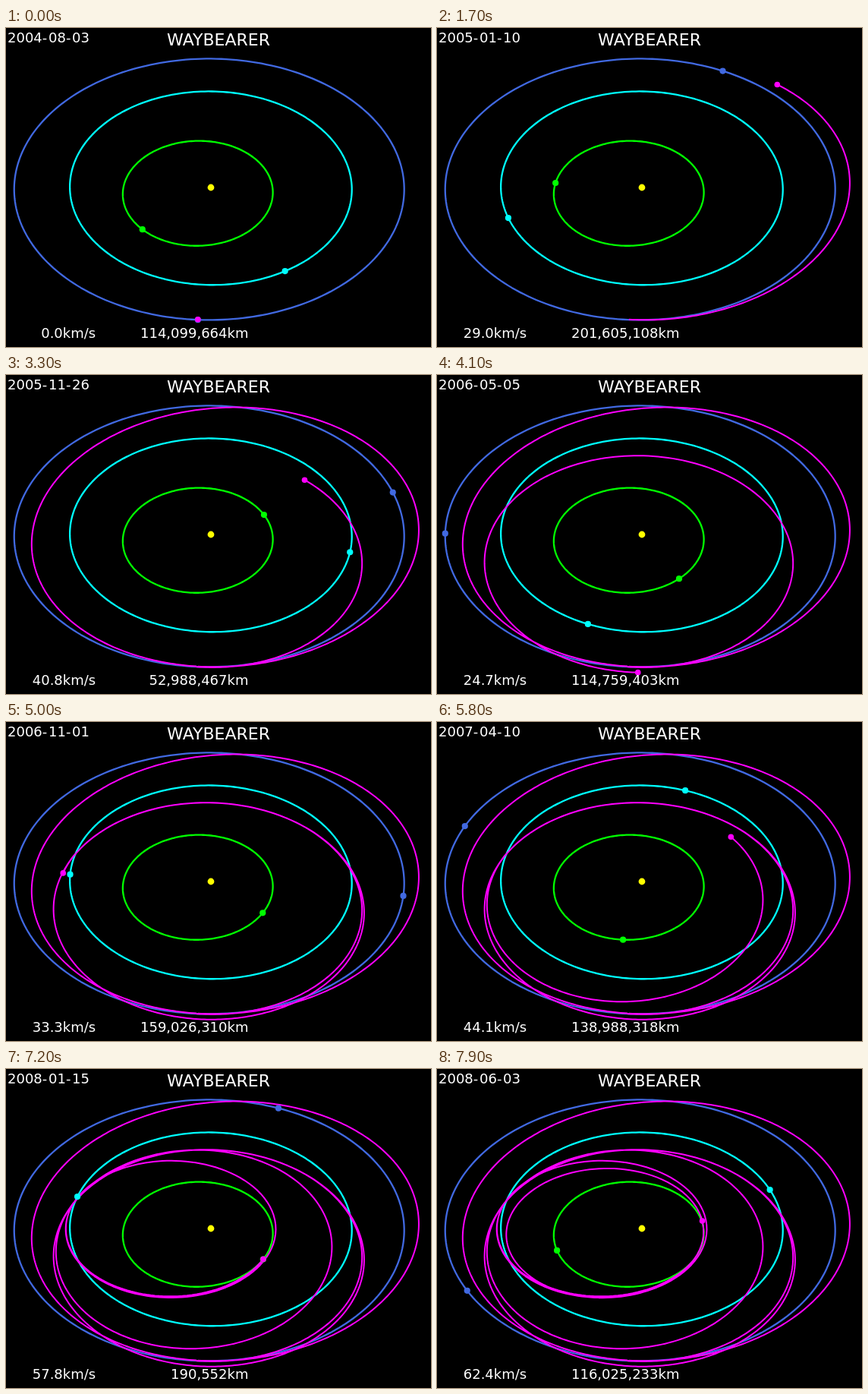
An HTML page with a canvas that plays this animation: 560x420 px, repeating every 8000 ms.

```html
<!DOCTYPE html>
<html lang="en">
<head>
<meta charset="utf-8">
<title>Spacecraft trajectory</title>
<style>
  html, body { margin: 0; width: 100%; height: 100%; overflow: hidden; background: #000; }
  canvas { display: block; }
</style>
</head>
<body>
<canvas id="stage" width="560" height="420"></canvas>
<script>
const ctx = document.getElementById('stage').getContext('2d');
const TAU = 2 * Math.PI, RAD = Math.PI / 180;
const AU_KM = 149597871, SUN_GM = 887.13; // GM in AU km²/s²
const STEP_DAYS = 20, LAST_STEP = 70, VIEW_TURN = 45;
const SUN = { x: 270, y: 210 };
const J2000 = -1675.8; // in days since launch

// Angles are in degrees, distances in AU, the mean anomaly at epoch in radians.
const planet = (color, a, e, incl, node, peri, longitude) =>
  ({ color, a, e, incl, node, peri, epoch: J2000, anomaly: (longitude - peri) * RAD });
const earth = planet('#4169e1', 1, 0.0167, 0, 0, 102.94, 100.46);
const venus = planet('#00ffff', 0.7233, 0.0068, 3.39, 76.68, 131.56, 181.98);
const mercury = planet('#00ff00', 0.3871, 0.2056, 7, 48.33, 77.46, 252.25);
const planets = [earth, venus, mercury];

function eccentricAnomaly(o, day) {
  const M = o.anomaly + 0.985609 * RAD / o.a ** 1.5 * (day - o.epoch);
  let E = M + o.e * Math.sin(M);
  for (let i = 0; i < 8; i++) E -= (E - o.e * Math.sin(E) - M) / (1 - o.e * Math.cos(E));
  return E;
}

const turn = (x, y, degrees) => {
  const c = Math.cos(degrees * RAD), s = Math.sin(degrees * RAD);
  return [x * c - y * s, x * s + y * c];
};

function pointOn(o, E) {
  const [along, across] = turn(o.a * (Math.cos(E) - o.e),
    o.a * Math.sqrt(1 - o.e * o.e) * Math.sin(E), o.peri - o.node);
  const [x, y] = turn(along, across * Math.cos(o.incl * RAD), o.node - VIEW_TURN);
  return { x, y, z: across * Math.sin(o.incl * RAD) };
}

const positionAt = (o, day) => pointOn(o, eccentricAnomaly(o, day));

// Mean anomaly at which an orbit passes the direction of point p.
function anomalyToward(o, p) {
  const [along, flat] = turn(p.x, p.y, VIEW_TURN - o.node);
  const angle = Math.atan2(flat / Math.cos(o.incl * RAD), along) - (o.peri - o.node) * RAD;
  const E = 2 * Math.atan(Math.sqrt((1 - o.e) / (1 + o.e)) * Math.tan(angle / 2));
  return E - o.e * Math.sin(E);
}

// Each leg leaves a planet, or after an engine burn the probe's own position.
const legs = [];
const arcAt = day => legs.findLast(leg => leg.epoch <= day);
function addLeg(epoch, body, plane, perihelion, aphelion, peri) {
  const a = (perihelion + aphelion) / 2;
  const leg = { ...plane, epoch, a, e: 1 - perihelion / a, peri };
  leg.anomaly = anomalyToward(leg, positionAt(body || arcAt(epoch), epoch));
  legs.push(leg);
}
const launchPlane = { incl: 6.3, node: 311 };
const cruisePlane = { incl: 2.5, node: 130.5 };
const steepPlane = { incl: 7.9, node: 47 };
const innerPlane = { incl: 6.9, node: 49 };
addLeg(0, earth, launchPlane, 0.921, 1.0765, 206.8);
addLeg(364.5, earth, cruisePlane, 0.602, 1.0153, 133.3);
addLeg(496.2, null, cruisePlane, 0.602, 1.055, 132.3);
addLeg(812.1, venus, steepPlane, 0.5493, 0.8973, 105);
addLeg(1036.7, venus, innerPlane, 0.3327, 0.7446, 46.6);
addLeg(1170.6, null, innerPlane, 0.3251, 0.7436, 45.7);
addLeg(1259.5, mercury, innerPlane, 0.3145, 0.6995, 55.2);

const project = p => ({ x: SUN.x + 257 * p.x, y: SUN.y - 172 * p.y - 86 * p.z });
const ring = o => Array.from({ length: 241 }, (_, i) => project(pointOn(o, i / 240 * TAU)));
const trail = Array.from({ length: LAST_STEP * STEP_DAYS + 1 },
  (_, day) => project(positionAt(arcAt(day), day)));

function line(points, color, width) {
  ctx.beginPath();
  for (const p of points) ctx.lineTo(p.x, p.y);
  ctx.strokeStyle = color;
  ctx.lineWidth = width;
  ctx.stroke();
}

function dot(p, color, radius) {
  ctx.beginPath();
  ctx.arc(p.x, p.y, radius, 0, TAU);
  ctx.fillStyle = color;
  ctx.fill();
}

function label(text, x, y, align = 'left', size = 18) {
  ctx.font = `${size}px Verdana, "DejaVu Sans", sans-serif`;
  ctx.textAlign = align;
  ctx.fillStyle = '#fff';
  ctx.fillText(text, x, y);
}

function reading(value, unit, x) {
  label(value, x, 408, 'right');
  label(unit, x, 408);
}

function drawDate(day) {
  const date = new Date(Date.UTC(2004, 7, 3 + day)).toISOString().slice(0, 10);
  let x = 2;
  for (const char of date) {
    label(char, x, 19);
    x += char === '-' ? 8.2 : 11.45;
  }
}

function draw(step) {
  const day = step * STEP_DAYS;
  ctx.fillStyle = '#000';
  ctx.fillRect(0, 0, 560, 420);
  ctx.lineJoin = 'round';

  for (const o of planets) line(ring(o), o.color, 2.3);
  line(trail.slice(0, day + 1), '#ff00ff', 2);
  dot(SUN, '#ffff00', 4.4);
  for (const o of planets) dot(project(positionAt(o, day)), o.color, 4.1);
  dot(trail[day], '#ff00ff', 3.8);

  const arc = arcAt(day), p = positionAt(arc, day), q = positionAt(mercury, day);
  const speed = step && Math.sqrt(SUN_GM * (2 / Math.hypot(p.x, p.y, p.z) - 1 / arc.a));
  const distance = Math.round(AU_KM * Math.hypot(p.x - q.x, p.y - q.y, p.z - q.z));
  drawDate(day);
  label('WAYBEARER', 280, 23, 'center', 22);
  reading(speed.toFixed(1), 'km/s', 74.8);
  reading(distance.toLocaleString('en-US'), 'km', 291.5);
}

let shown = -1;
function tick() {
  const time = performance.now() % 8000;
  const step = time < 1000 ? 0 : Math.floor((time - 900) / 100);
  if (step !== shown) draw(shown = step);
  requestAnimationFrame(tick);
}
tick();
</script>
</body>
</html>
```
